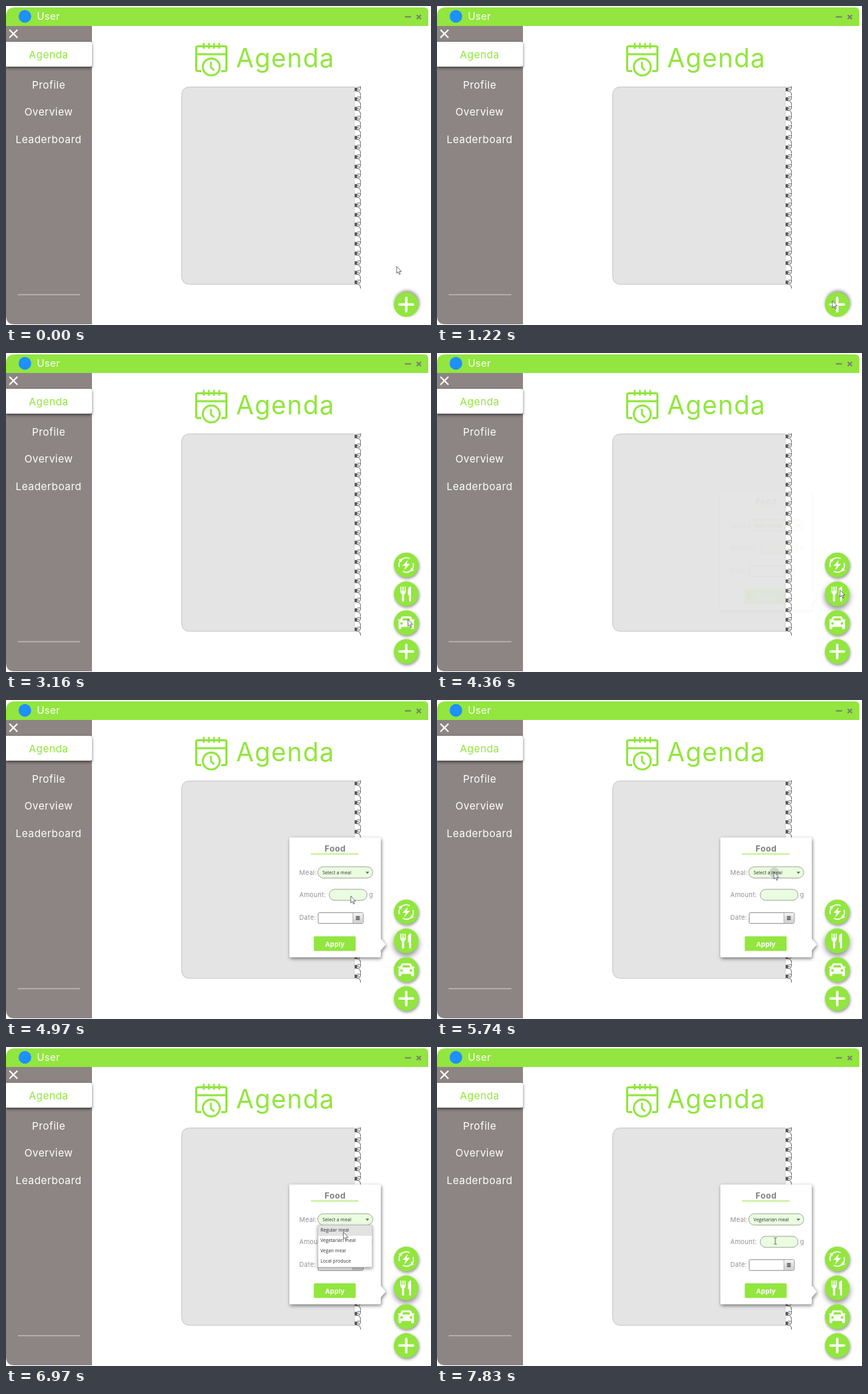
Write an HTML page that moves like this. It is 618x463 px and loops after 8000 ms.

```html
<!DOCTYPE html>
<html lang="en">
<head>
<meta charset="utf-8">
<title>Agenda</title>
<style>
  html, body { margin: 0; width: 100%; height: 100%; overflow: hidden; background: #fff; }
  svg { display: block; width: 618px; height: 463px; }
  text { font-family: Inter, "Open Sans", sans-serif; }
  .nav { font-size: 15px; letter-spacing: .45px; fill: #fff; text-anchor: middle; }
  .label { font-size: 9.4px; letter-spacing: .22px; fill: #929292; }
  .small { font: 6.8px "Open Sans", "Noto Sans", sans-serif; fill: #333; }
  .green { fill: #92e63f; }
  .tab { filter: drop-shadow(0 2px 2px rgba(0, 0, 0, .55)); }
  .card { filter: drop-shadow(1px 2px 2.5px rgba(0, 0, 0, .5)); }
  .menu { filter: drop-shadow(0 2px 2.5px rgba(0, 0, 0, .4)); }
</style>
</head>
<body>
<svg viewBox="0 0 618 463">
  <defs>
    <linearGradient id="grey" x2="0" y2="1">
      <stop offset="0" stop-color="#f4f4f4"/><stop offset="1" stop-color="#cfcfcf"/>
    </linearGradient>
    <clipPath id="pillClip"><rect x="453" y="242" width="80.5" height="16.5" rx="8"/></clipPath>
  </defs>
  <rect width="618" height="463" fill="#fff"/>

  <!-- window and sidebar -->
  <path fill="#8c8583" d="M0 29H125V462H12Q0 462 0 449Z"/>
  <path class="green" d="M0 29V15Q0 2 13 2H608Q614 2 614 8V29Z"/>
  <circle cx="27.5" cy="15" r="9.2" fill="#1e90ff"/>
  <text x="45" y="20" font-size="14.5" letter-spacing=".3" fill="#fff">User</text>
  <path d="M580 15.7H589M597.2 13L603.4 19M603.4 13L597.2 19" stroke="#7b8072" stroke-width="2" fill="none"/>
  <path d="M5 34.5L16.6 46M16.6 34.5L5 46" stroke="#fff" stroke-width="2"/>
  <path class="tab" fill="#fff" d="M0 52H123Q125 52 125 54V86Q125 88 123 88H0Z"/>
  <text class="nav" x="62" y="76" style="fill:#92e63f">Agenda</text>
  <text class="nav" x="62" y="119.5">Profile</text>
  <text class="nav" x="62" y="159">Overview</text>
  <text class="nav" x="62" y="199">Leaderboard</text>
  <path d="M17 419H108" stroke="#d6d2d1"/>

  <!-- heading -->
  <g fill="none" stroke="#92e63f" stroke-width="3">
    <path d="M284 94.5H279Q276.5 94.5 276.5 92V60.5Q276.5 58.5 278.5 58.5H318.5Q320.5 58.5 320.5 60.5V92Q320.5 94.5 318 94.5H313M276.5 70H320.5"/>
    <path d="M287.5 53.5V62M295 53.5V62M302.5 53.5V62M310 53.5V62" stroke-width="2.6"/>
    <circle cx="298.5" cy="88.5" r="15" fill="#fff" stroke="none"/>
    <circle cx="298.5" cy="88.5" r="12.3" fill="#fff"/>
    <path d="M298 81V89L302.5 93.5" stroke-width="2.8"/>
  </g>
  <text class="green" x="334.5" y="89" font-size="37.5" letter-spacing="1.1">Agenda</text>

  <!-- notebook -->
  <path d="M507 117.5H267.5Q255.5 117.5 255.5 129.5V392Q255.5 404 267.5 404H507Z" fill="#e4e4e4" stroke="#c6c6c6"/>
  <rect x="507" y="117" width="6" height="287.5" fill="#fff"/>
  <g id="rings"></g>

  <g id="buttons"></g>

  <!-- food form -->
  <g id="form">
    <path class="card" fill="#fff" d="M414 199.5H543Q545 199.5 545 201.5V346.5L552.3 355L545 363.5V371.5Q545 373.5 543 373.5H414Q412 373.5 412 371.5V201.5Q412 199.5 414 199.5Z"/>
    <text x="478.7" y="219.8" font-size="12" font-weight="700" letter-spacing=".5" fill="#808080" text-anchor="middle">Food</text>
    <path d="M443.5 223.5H512.5" stroke="#92e63f" stroke-width="1.2"/>
    <text class="label" x="426.5" y="254.3">Meal:</text>
    <text class="label" x="426.5" y="285.8">Amount:</text>
    <text class="label" x="527.8" y="285.8">g</text>
    <text class="label" x="426.5" y="319">Date:</text>
    <g fill="#eafde0" stroke="#a0a59c">
      <rect x="453.3" y="242" width="80" height="16.4" rx="8.2"/>
      <rect x="470" y="274.8" width="55" height="16" rx="8"/>
    </g>
    <circle id="ripple" cx="490.5" cy="250.5" fill="#000" clip-path="url(#pillClip)"/>
    <text id="choice" class="small" x="460.3" y="253"></text>
    <path d="M522.8 249.2H528.2L525.5 252.3Z" fill="#666"/>
    <rect x="454" y="308.7" width="65.3" height="15.6" rx="1.5" fill="#fff" stroke="#8c8c8c"/>
    <rect x="504.5" y="309.2" width="14.3" height="14.6" fill="url(#grey)"/>
    <path d="M504.5 309V324" stroke="#a5a5a5" stroke-width=".8"/>
    <path d="M508.8 314.3H514.4M508.8 316.4H514.4M508.8 318.5H514.4" stroke="#444" stroke-width="1.3"/>
    <rect class="green" x="447.5" y="343" width="61" height="21.3" rx="1.5"/>
    <text x="478.2" y="357.6" font-size="9.6" font-weight="700" letter-spacing=".1" fill="#fff" text-anchor="middle">Apply</text>
  </g>

  <g id="menu">
    <rect class="menu" x="453.7" y="258.7" width="78.6" height="61" fill="#fff" stroke="#bdbdbd" stroke-width=".7"/>
    <rect id="hover" x="454" width="78" height="15" fill="#e2e2e2"/>
    <g id="items"></g>
  </g>

  <path id="arrow" d="M0 0V10L2.3 7.9L3.9 11.6L5.4 11L3.8 7.3H7Z" fill="#fff" stroke="#444" stroke-width=".75"/>
  <path id="beam" d="M489.8 277H491.2L492 277.6L492.8 277H494.2M492 277.6V285.6M489.8 286.2H491.2L492 285.6L492.8 286.2H494.2" fill="none" stroke="#444" stroke-width=".8"/>
</svg>
<script>
const LOOP = 8000;
const $ = id => document.getElementById(id);
const clamp = v => Math.max(0, Math.min(1, v));
const show = (el, on) => el.style.display = on ? '' : 'none';

// Fraction of n equal jumps made, the first at a and the last at b.
function jumps(t, a, b, n) {
  if (t < a) return 0;
  if (t >= b) return 1;
  return (Math.floor((t - a) / (b - a) * (n - 1) + 1e-6) + 1) / n;
}

$('rings').innerHTML = Array.from({ length: 21 }, (_, i) => {
  const y = 121 + 14 * i;
  return `<rect x="507" y="${y - 2.5}" width="3.6" height="5.2" fill="#555"/>
    <path d="M509.5 ${y + 2.7}H512Q515.6 ${y + 2} 515.6 ${y - 2}V${y - 4}M510.5 ${y - 2}Q511 ${y + 1} 513.5 ${y}M515.6 ${y - 4}Q513 ${y - 1.5} 511 ${y - 3.5}M515.6 ${y + 9}Q516 ${y + 4} 512.5 ${y + 3}"
      fill="none" stroke="#555" stroke-width=".9"/>`;
}).join('');

const meals = ['Regular meal', 'Vegetarian meal', 'Vegan meal', 'Local produce'];
$('items').innerHTML = meals.map((m, i) =>
  `<text class="small" x="457.2" y="${268.4 + 15 * i}">${m}</text>`).join('');

const icons = {
  power: `<g fill="none" stroke="#fff" stroke-width="1.7">
      <path d="M-10 3A10.4 10.4 0 0 1 5 -9.1M10 -3A10.4 10.4 0 0 1 -5 9.1"/></g>
    <path fill="#fff" d="M-11.5 -7.5L-6 -9.5L-7 -4ZM11.5 7.5L6 9.5L7 4ZM2.5 -7.5L-5.5 1.3H-1L-3 7.7L5.5 -1.7H.8Z"/>`,
  food: `<path fill="#fff" d="M-8.5 -10.5H-7V-4H-5.5V-10.5H-3.8V-4H-2.3V-10.5H-.8V-3Q-.8 0 -3 .6V10Q-3 11.2 -4.6 11.2T-6.3 10V.6Q-8.5 0 -8.5 -3ZM2.5 -5Q2.5 -10 7 -10.8V10Q7 11.2 5.5 11.2T4 10V2H2.5Z"/>`,
  car: `<path fill="#fff" fill-rule="evenodd" d="M-12 -3.8Q-12 -4.8 -11 -4.8H-8.8L-7.2 -8Q-6.6 -9.2 -5 -9.2H5Q6.6 -9.2 7.2 -8L8.8 -4.8H11Q12 -4.8 12 -3.8T11 -2.7H10.2Q11.2 -1.8 11.2 0V7.8Q11.2 9.3 9.8 9.3H8.5Q7.2 9.3 7.2 7.8V6H-7.2V7.8Q-7.2 9.3 -8.5 9.3H-9.8Q-11.2 9.3 -11.2 7.8V0Q-11.2 -1.8 -10.2 -2.7H-11Q-12 -2.7 -12 -3.8ZM-5.8 -3.2H5.8L4.5 -6.4H-4.5ZM-8.8 1A1.9 1.9 0 1 0 -5 1A1.9 1.9 0 1 0 -8.8 1ZM5 1A1.9 1.9 0 1 0 8.8 1A1.9 1.9 0 1 0 5 1Z"/>`,
  plus: `<path id="plus" d="M-9.8 0H9.8M0 -9.8V9.8" stroke="#fff" stroke-width="3.6" stroke-linecap="round"/>`
};
$('buttons').innerHTML = Object.keys(icons).map(k =>
  `<g id="${k}Btn"><circle id="${k}Disc" r="18" fill="#92e63f"/>${icons[k]}</g>`).join('');

const shadow = (id, x, y, blur, a) =>
  $(id + 'Disc').style.filter = `drop-shadow(${x}px ${y}px ${blur}px rgba(0,0,0,${a}))`;
const place = (id, y, s) => {
  show($(id + 'Btn'), s > 0);
  $(id + 'Btn').setAttribute('transform', `translate(582 ${y}) scale(${s})`);
};

// Pointer moves: start, end, jumps, bend point, end point, ease-out power.
const moves = [
  [70, 130, 2, 525, 334, 549, 334, 1],
  [280, 520, 4, 556, 400, 574, 451, 1],
  [670, 900, 4, 574, 440, 577, 430, 1],
  [1220, 1220, 1, 576, 429, 575, 428, 1],
  [1520, 1600, 2, 576, 428, 578, 428, 1],
  [2850, 3480, 9, 588, 378, 586, 344, 1],
  [4740, 5510, 11, 503, 324, 490, 250, 3],
  [6430, 7050, 9, 490, 252, 491, 280, 1]
];
function pointer(t) {
  let x = 568, y = 378;
  for (const [a, b, n, cx, cy, ex, ey, pow] of moves) {
    if (t < a) break;
    const u = 1 - (1 - jumps(t, a, b, n)) ** pow, v = 1 - u;
    x = v * v * x + 2 * u * v * cx + u * u * ex;
    y = v * v * y + 2 * u * v * cy + u * u * ey;
  }
  return [x, y];
}

function draw(t) {
  // add button opens its three children
  const p = jumps(t, 1830, 2310, 7), k = p * 7;
  const busy = p > 0 && p < 1;
  place('plus', 433.3, 1);
  place('car', 391.5, clamp(k / 2));
  place('food', 349.6, clamp((k - 1) / 3));
  place('power', 307.7, clamp((k - 1.5) / 3));
  $('plusDisc').setAttribute('fill', busy ? '#7fbe3c' : '#92e63f');
  $('plus').setAttribute('transform', `rotate(${180 * p}) scale(${busy ? .88 : 1})`);
  $('plus').setAttribute('stroke', busy ? '#dcdcdc' : '#fff');
  if (p === 0) shadow('plus', 1, -2, 2.5, .45);
  else shadow('plus', 1, 2, 2, .42);
  shadow('car', 1, 2, 2, .42);
  shadow('power', 1, 2, 2, .42);
  const h = jumps(t, 3630, 3800, 3);
  shadow('food', 1 - h, 2 + 2 * h, 2 + 2 * h, .42 + .05 * h);

  // form and meal menu
  const f = jumps(t, 4270, 4520, 4);
  show($('form'), f > 0);
  $('form').setAttribute('opacity', f ** 4);
  $('ripple').setAttribute('r', t < 5890 ? 7.5 : 14);
  $('ripple').setAttribute('opacity', t < 5740 || t >= 5970 ? 0 : t < 5890 ? .14 : .07);
  $('choice').textContent = t < 7660 ? 'Select a meal' : meals[1];
  show($('menu'), t >= 5890 && t < 7830);
  $('menu').setAttribute('opacity', t < 5970 ? .6 : 1);

  const [x, y] = pointer(t);
  const row = Math.floor((y - 259) / 15);
  show($('hover'), row >= 0 && row < 4);
  $('hover').setAttribute('y', 259 + 15 * row);
  $('hover').setAttribute('fill', t < 7660 ? '#e2e2e2' : '#d4d4d4');
  $('arrow').setAttribute('transform', `translate(${x} ${y})`);
  show($('arrow'), t < 7830);
  show($('beam'), t >= 7830);
}

const start = performance.now();
function tick() {
  draw((performance.now() - start) % LOOP);
  requestAnimationFrame(tick);
}
tick();
</script>
</body>
</html>
```
